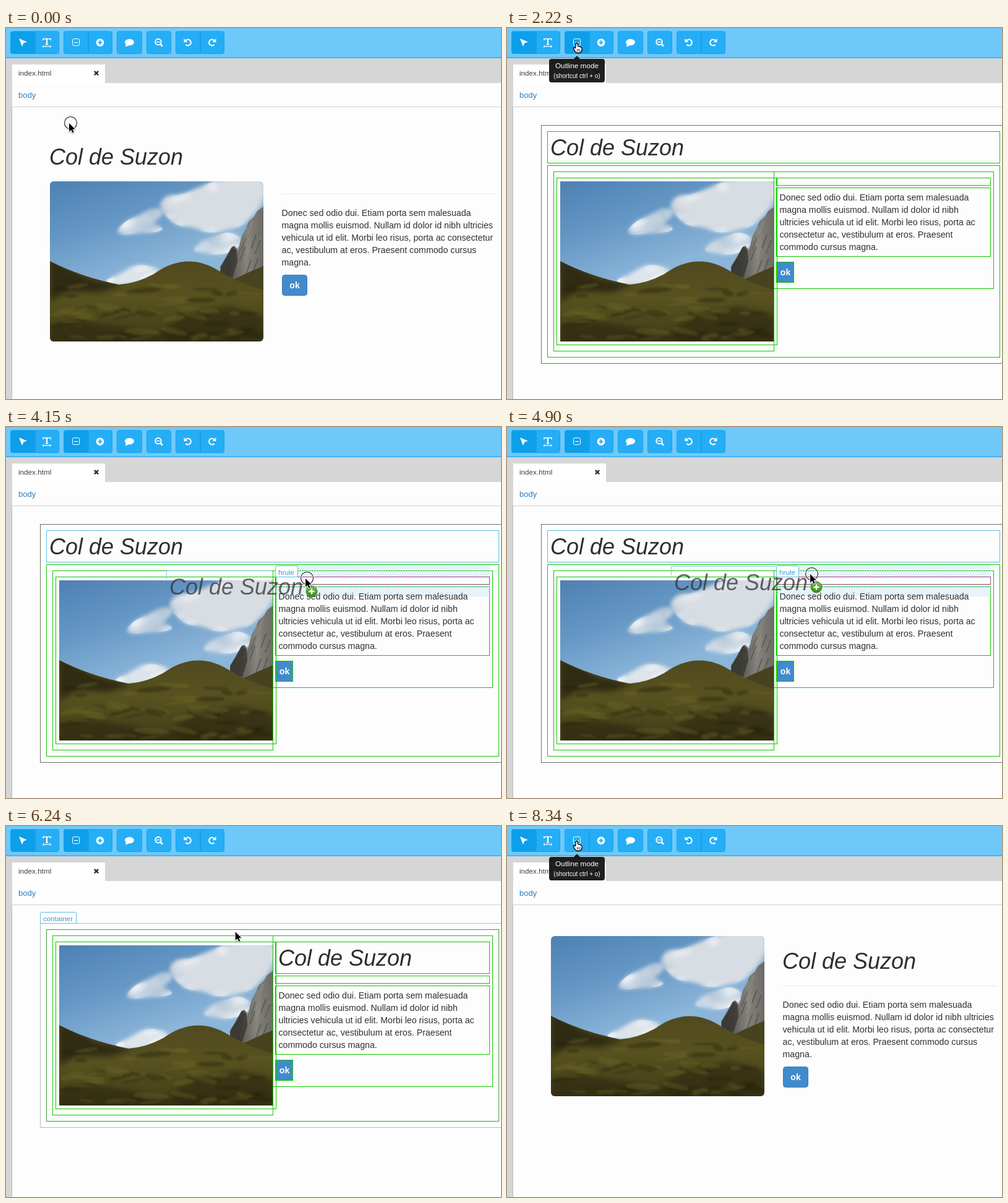
Animation of 800x600 px, one loop 9830 ms. Source, as an HTML page with a canvas:

```html
<!DOCTYPE html>
<html lang="en">
<head>
<meta charset="utf-8">
<title>Outline mode</title>
<style>
  html, body { margin: 0; width: 100%; height: 100%; overflow: hidden; background: #fff; }
  canvas { display: block; }
</style>
</head>
<body>
<canvas id="stage" width="800" height="600"></canvas>
<script>
const LOOP = 9830;
const ctx = document.getElementById('stage').getContext('2d');
const SANS = '"Liberation Sans", Arial, Helvetica, sans-serif';
const GREEN = '#12c800', CYAN = '#5cbde8', BLUE = '#25aef6', GRAY = '#66755f';
const TITLE = 'Col de Suzon';
const WIDE = [
  'Donec sed odio dui. Etiam porta sem malesuada',
  'magna mollis euismod. Nullam id dolor id nibh ultricies',
  'vehicula ut id elit. Morbi leo risus, porta ac consectetur',
  'ac, vestibulum at eros. Praesent commodo cursus',
  'magna.'
];
const NARROW = [
  'Donec sed odio dui. Etiam porta sem malesuada',
  'magna mollis euismod. Nullam id dolor id nibh',
  'ultricies vehicula ut id elit. Morbi leo risus, porta ac',
  'consectetur ac, vestibulum at eros. Praesent',
  'commodo cursus magna.'
];

// ---------- helpers ----------
function rect(x, y, w, h, color) {
  ctx.fillStyle = color;
  ctx.fillRect(x, y, w, h);
}

function round(x, y, w, h, r, fill, stroke) {
  ctx.beginPath();
  ctx.roundRect(x, y, w, h, r);
  if (fill) { ctx.fillStyle = fill; ctx.fill(); }
  if (stroke) { ctx.lineWidth = 1; ctx.strokeStyle = stroke; ctx.stroke(); }
}

function text(s, x, y, size, color, style = '', align = 'left') {
  ctx.font = `${style} ${size}px ${SANS}`;
  ctx.textAlign = align;
  ctx.fillStyle = color;
  ctx.fillText(s, x, y);
}

function box(x, y, right, bottom, color = GREEN) {
  ctx.lineWidth = 1;
  ctx.strokeStyle = color;
  ctx.strokeRect(x + .5, y + .5, right - x - 1, bottom - y - 1);
}

function poly(c, pts, close = true) {
  c.beginPath();
  for (let i = 0; i < pts.length; i += 2) c.lineTo(pts[i], pts[i + 1]);
  if (close) c.closePath();
}

function line(pts, width, color) {
  poly(ctx, pts, false);
  ctx.lineWidth = width;
  ctx.strokeStyle = color;
  ctx.stroke();
}

function smooth(c, pts) {
  const n = pts.length / 2;
  const at = i => [pts[(i % n) * 2], pts[(i % n) * 2 + 1]];
  c.beginPath();
  for (let i = 0; i <= n; i++) {
    const [x, y] = at(i), [u, v] = at(i + 1);
    if (i) c.quadraticCurveTo(x, y, (x + u) / 2, (y + v) / 2);
    else c.moveTo((x + u) / 2, (y + v) / 2);
  }
}

function randomizer(seed) {
  return () => (seed = (seed * 16807) % 2147483647) / 2147483647;
}

// ---------- landscape ----------
function makePhoto() {
  const cv = document.createElement('canvas');
  cv.width = 346;
  cv.height = 259;
  const c = cv.getContext('2d');
  const rnd = randomizer(77);

  const sky = c.createLinearGradient(0, 0, 60, 175);
  sky.addColorStop(0, '#4d81b3');
  sky.addColorStop(.5, '#6597c5');
  sky.addColorStop(1, '#8bb5d9');
  c.fillStyle = sky;
  c.fillRect(0, 0, 346, 259);

  const clouds = [
    [176, 40, 188, 22, 212, 22, 240, 10, 262, 1, 290, -6, 350, -8, 350, 30, 332, 52, 312, 72, 285, 80, 255, 84, 232, 74, 205, 72, 188, 56],
    [106, 83, 122, 64, 142, 56, 166, 43, 186, 46, 178, 60, 164, 68, 186, 76, 172, 83, 140, 84, 122, 87],
    [230, 112, 246, 96, 268, 90, 290, 80, 314, 94, 302, 110, 276, 120, 250, 116],
    [84, 162, 110, 152, 132, 137, 152, 134, 184, 144, 164, 158, 126, 172]
  ];
  const tones = ['#d7dde3', '#c3d2e0', '#cdd9e4', '#dde4ea'];
  clouds.forEach((pts, i) => {
    c.filter = 'blur(3px)';
    c.fillStyle = tones[i];
    smooth(c, pts);
    c.fill();
    c.save();
    c.clip();
    c.filter = 'blur(4px)';
    for (let k = 0; k < 9; k++) {
      const j = Math.floor(rnd() * pts.length / 2) * 2;
      c.fillStyle = k % 3 ? 'rgba(246,248,250,.6)' : 'rgba(160,182,204,.4)';
      c.beginPath();
      c.ellipse(pts[j], pts[j + 1] + 4, 9 + rnd() * 16, 5 + rnd() * 8, -.3, 0, 7);
      c.fill();
    }
    c.restore();
  });
  c.filter = 'none';

  // cliff
  const rock = c.createLinearGradient(290, 0, 346, 0);
  rock.addColorStop(0, '#56544f');
  rock.addColorStop(.5, '#85837c');
  rock.addColorStop(1, '#6c6a64');
  c.fillStyle = rock;
  poly(c, [346, 41, 336, 48, 331, 57, 323, 64, 318, 75, 311, 88, 305, 111, 299, 104, 294, 107, 284, 125, 276, 138, 276, 152, 300, 162, 346, 150]);
  c.fill();
  c.save();
  c.clip();
  c.lineWidth = 2;
  for (let i = 0; i < 26; i++) {
    const x = 278 + rnd() * 68, y = 50 + rnd() * 90;
    c.strokeStyle = i % 2 ? 'rgba(50,48,44,.4)' : 'rgba(165,162,152,.3)';
    c.beginPath();
    c.moveTo(x, y);
    c.lineTo(x - 8, y + 22);
    c.stroke();
  }
  c.restore();
  c.fillStyle = 'rgba(52,51,46,.75)';
  poly(c, [296, 105, 303, 112, 304, 130, 296, 156, 276, 152, 277, 138, 285, 125]);
  c.fill();

  // hills
  c.fillStyle = '#47431f';
  poly(c, [290, 162, 320, 148, 346, 137, 346, 200, 300, 190]);
  c.fill();
  const hill = c.createLinearGradient(0, 130, 0, 259);
  hill.addColorStop(0, '#514a20');
  hill.addColorStop(.45, '#57521f');
  hill.addColorStop(1, '#423d18');
  c.fillStyle = hill;
  c.beginPath();
  c.moveTo(0, 129);
  c.quadraticCurveTo(48, 154, 112, 167);
  c.quadraticCurveTo(140, 165, 168, 150);
  c.quadraticCurveTo(222, 111, 276, 146);
  c.quadraticCurveTo(302, 162, 346, 176);
  c.lineTo(346, 259);
  c.lineTo(0, 259);
  c.fill();
  c.save();
  c.clip();
  c.filter = 'blur(5px)';
  c.fillStyle = 'rgba(34,31,16,.72)';
  poly(c, [0, 125, 60, 156, 118, 168, 80, 180, 30, 178, 0, 195]);
  c.fill();
  c.fillStyle = 'rgba(36,33,14,.5)';
  poly(c, [0, 232, 60, 226, 130, 238, 180, 250, 180, 265, 0, 265]);
  c.fill();
  poly(c, [180, 240, 220, 215, 290, 202, 346, 218, 346, 262, 180, 262]);
  c.fill();
  c.filter = 'blur(1.5px)';
  for (let i = 0; i < 60; i++) {
    const x = rnd() * 346, y = 168 + rnd() * 90;
    c.fillStyle = i % 2 ? 'rgba(112,106,42,.36)' : 'rgba(38,34,14,.4)';
    c.beginPath();
    c.ellipse(x, y, 8 + rnd() * 22, 1.5 + rnd() * 4, (rnd() - .5) * .6, 0, 7);
    c.fill();
  }
  c.restore();
  return cv;
}
const photo = makePhoto();

// ---------- toolbar ----------
function button(x, right, active, corners = 3) {
  round(x + .5, 5.5, right - x - 1, 36, corners, active ? '#0d9fea' : BLUE, '#1a9fe6');
}

function turnIcon(x, dir) {
  ctx.save();
  ctx.translate(x, 23.5);
  ctx.scale(dir, 1);
  ctx.beginPath();
  ctx.arc(0, 0, 4.8, -2.5, 2.4);
  ctx.lineWidth = 2.2;
  ctx.strokeStyle = '#fff';
  ctx.stroke();
  poly(ctx, [-6.5, -6.5, -6.5, -.5, -.5, -.5]);
  ctx.fillStyle = '#fff';
  ctx.fill();
  ctx.restore();
}

function toolbar(outlined) {
  rect(0, 0, 800, 47, '#6ec9fa');
  rect(0, 47, 800, 2, '#45b4f0');
  const L = [3, 0, 0, 3], R = [0, 3, 3, 0];
  button(47, 86, false, R);
  button(7, 47, true, L);
  button(133, 172, false, R);
  button(93, 133, outlined, L);
  button(179, 220);
  button(227, 267);
  button(274, 314, false, L);
  button(314, 353, false, R);

  ctx.fillStyle = '#fff';
  poly(ctx, [21, 17, 34, 22.5, 28.5, 24.3, 26, 30]);
  ctx.fill();

  line([60, 20, 60, 17.5, 72, 17.5, 72, 20], 1.6, '#fff');
  line([66, 17, 66, 27], 2.2, '#fff');
  line([63.5, 26.8, 68.5, 26.8], 1.2, '#fff');
  line([59, 29.8, 73, 29.8], 1.2, '#fff');
  line([61, 28, 59, 29.8, 61, 31.6], 1, '#fff');
  line([71, 28, 73, 29.8, 71, 31.6], 1, '#fff');

  round(107.5, 17.5, 11, 11, 2, null, '#fff');
  line([110, 23.5, 116, 23.5], 1.2, '#fff');

  ctx.fillStyle = '#fff';
  ctx.beginPath();
  ctx.arc(152, 23.5, 6.3, 0, 7);
  ctx.fill();
  line([148.5, 23.5, 155.5, 23.5], 2, BLUE);
  line([152, 20, 152, 27], 2, BLUE);

  ctx.fillStyle = '#fff';
  ctx.beginPath();
  ctx.ellipse(199.5, 23, 7.5, 5.3, 0, 0, 7);
  ctx.fill();
  poly(ctx, [194, 25, 199, 28, 193, 30.5]);
  ctx.fill();

  ctx.beginPath();
  ctx.arc(246, 22.5, 4.7, 0, 7);
  ctx.lineWidth = 2;
  ctx.strokeStyle = '#fff';
  ctx.stroke();
  line([249.5, 26, 253, 29.5], 2.6, '#fff');
  line([243.5, 22.5, 248.5, 22.5], 1.5, '#fff');

  turnIcon(294, 1);
  turnIcon(333, -1);
}

function chrome(outlined) {
  rect(0, 0, 800, 600, '#d6d6d6');
  rect(10, 89, 790, 511, '#fdfdfd');
  rect(10, 59, 150, 30, '#fff');
  rect(10, 127, 790, 1, '#cfcfcf');
  rect(9, 128, 1, 472, '#b9b9b9');
  toolbar(outlined);
  text('index.html', 20, 77, 11.7, '#3a3f45');
  line([142.8, 69.8, 149.2, 76.2], 2.4, '#26323d');
  line([149.2, 69.8, 142.8, 76.2], 2.4, '#26323d');
  text('body', 20, 113, 13, '#327fbd');
}

// ---------- page ----------
function paragraph(lines, x, y) {
  lines.forEach((s, i) => text(s, x, y + i * 20, 14.2, '#303030'));
}

function title(x, y, color = '#2e2e2e') {
  text(TITLE, x, y, 36, color, 'italic');
}

function okButton(x, y, w, h, r) {
  round(x + .5, y + .5, w - 1, h - 1, r, '#428bca', '#357ebd');
  text('ok', x + w / 2, y + 22, 14, '#fff', 'bold', 'center');
}

function plainPage(moved) {
  const dy = moved ? -10 : 0;
  ctx.save();
  ctx.beginPath();
  ctx.roundRect(71, moved ? 178 : 248, 345, 259, 6);
  ctx.clip();
  ctx.drawImage(photo, 71, moved ? 178 : 248, 345, 259);
  ctx.restore();
  if (moved) title(445, 231);
  else title(70, 221);
  rect(446, 268 + dy, 345, 1, '#e8e8e8');
  paragraph(WIDE, 445.5, 304 + dy);
  okButton(446, 399 + dy, 41, 34, 4);
}

function label(s, x, bottom) {
  ctx.font = `11.7px ${SANS}`;
  const w = Math.round(ctx.measureText(s).width) + 10;
  round(x + .5, bottom - 17.5, w, 18, [2, 2, 0, 0], '#fff', CYAN);
  text(s, x + 5, bottom - 3, 11.7, '#3a98cc');
}

function hatch(x, y, w, h) {
  ctx.save();
  ctx.beginPath();
  ctx.rect(x, y, w, h);
  ctx.clip();
  ctx.beginPath();
  for (let i = -h; i < w; i += 4) {
    ctx.moveTo(x + i, y + h);
    ctx.lineTo(x + i + h, y);
  }
  ctx.lineWidth = 1;
  ctx.strokeStyle = '#a9daf3';
  ctx.stroke();
  ctx.restore();
}

function dropZone(name, x, y, right, bottom) {
  hatch(x, y - 19, right - x, 19);
  hatch(x, bottom, right - x, 19);
  box(x, y, right, bottom, '#a0447c');
  label(name, x, y);
}

function outlinePage(moved, hover, target) {
  const top = moved ? -55 : 0;
  ctx.drawImage(photo, 86, 248 + top);
  okButton(436, 378, 28, 34, 2);

  box(55, 157, 820, 543 + top, hover === 'container' ? '#aebcc2' : GRAY);
  box(65, 222 + top, 797, 533 + top, moved ? '#3d9a34' : GREEN);
  box(75, 232 + top, 432, 523 + top);
  box(80, 242 + top, 437, 513 + top);
  box(431, 232 + top, 787, 422);
  if (moved) {
    box(435, 187, 782, 239);
    title(440, 226);
  } else {
    box(65, 167, 797, 219, hover === 'header' || target !== undefined ? CYAN : GREEN);
    title(70, 206);
  }
  box(435, 242, 782, 255);
  box(435, 258, 782, 370);
  box(435, 378, 464, 412);
  if (target === 'row') dropZone('row', 65, 222, 797, 533);
  if (target === 'hrule') dropZone('hrule', 435, 242, 782, 255);
  paragraph(NARROW, 440.5, 279);
  if (hover === 'header') label('header', 65, 167);
  if (hover === 'container') label('container', 55, 157);
}

// ---------- overlays ----------
function tooltip(alpha) {
  ctx.save();
  ctx.globalAlpha = alpha;
  ctx.beginPath();
  ctx.roundRect(68, 50, 90, 38, 4);
  ctx.moveTo(108, 50);
  ctx.lineTo(113, 45);
  ctx.lineTo(118, 50);
  ctx.fillStyle = '#131313';
  ctx.fill();
  ctx.globalAlpha = Math.min(1, alpha + .35);
  text('Outline mode', 113, 65, 11.8, '#fff', '', 'center');
  text('(shortcut ctrl + o)', 113, 81, 10, '#fff', '', 'center');
  ctx.restore();
}

function ring(x, y) {
  for (const [w, color] of [[3, 'rgba(255,255,255,.8)'], [1.1, '#111']]) {
    ctx.beginPath();
    ctx.arc(x, y, 10, 0, 7);
    ctx.lineWidth = w;
    ctx.strokeStyle = color;
    ctx.stroke();
  }
}

function pointer(x, y, hand) {
  ctx.save();
  ctx.translate(x, y);
  ctx.lineJoin = 'round';
  ctx.shadowColor = 'rgba(0,0,0,.35)';
  ctx.shadowBlur = 2;
  ctx.shadowOffsetY = 1;
  if (hand) {
    smooth(ctx, [-2, -3, 1, -3, 1.5, 3, 4, 2.5, 6, 4, 8, 5, 8.5, 8, 6.5, 13, -1, 13.5, -4, 9, -6, 6, -4.5, 4, -2, 6.5]);
    ctx.fillStyle = '#fff';
    ctx.fill();
    ctx.shadowColor = 'transparent';
    ctx.lineWidth = 1.3;
    ctx.strokeStyle = '#000';
    ctx.stroke();
    for (let i = 0; i < 3; i++) line([.5 + i * 2.2, 7, .5 + i * 2.2, 11], .8, '#000');
  } else {
    poly(ctx, [0, 0, 0, 13.5, 3.2, 10.8, 5.4, 15.6, 7.7, 14.6, 5.5, 9.9, 9.6, 9.6]);
    ctx.lineWidth = 2;
    ctx.strokeStyle = '#fff';
    ctx.stroke();
    ctx.shadowColor = 'transparent';
    ctx.fillStyle = '#000';
    ctx.fill();
  }
  ctx.restore();
}

function ghost(x, y) {
  ctx.save();
  ctx.globalAlpha = .75;
  line([x - 224.5, y + 2, x - 224.5, y - 12.5, x - 54, y - 12.5], 1, CYAN);
  title(x - 220, y + 26, '#333');
  ctx.restore();
}

function addBadge(x, y) {
  const g = ctx.createLinearGradient(0, y - 9, 0, y + 9);
  g.addColorStop(0, '#7fc24e');
  g.addColorStop(1, '#2f8a12');
  ctx.beginPath();
  ctx.arc(x, y, 9, 0, 7);
  ctx.fillStyle = g;
  ctx.fill();
  ctx.lineWidth = 1;
  ctx.strokeStyle = '#3d7a24';
  ctx.stroke();
  line([x - 4.5, y, x + 4.5, y], 2.4, '#fff');
  line([x, y - 4.5, x, y + 4.5], 2.4, '#fff');
}

// ---------- timeline ----------
// [start, end, steps, x, y]: the pointer reaches x, y on the last step
const MOVES = [
  [450, 1480, 8, 113, 27],
  [2520, 3110, 5, 291, 182],
  [3708, 4150, 4, 484, 245],
  [4600, 4900, 3, 490, 238],
  [5800, 6840, 8, 113, 27]
];

function pointerAt(t) {
  let x = 102, y = 154;
  for (const [a, b, n, u, v] of MOVES) {
    if (t < a) break;
    const step = Math.floor((t - a) / ((b - a) / (n - 1)) + .02) + 1;
    const p = Math.min(1, step / n), e = p * p * (3 - 2 * p);
    x += (u - x) * e;
    y += (v - y) * e;
  }
  return [x, y];
}

const within = (t, a, b) => t >= a && t < b;

function tipAlpha(t) {
  if (within(t, 2070, 2220) || within(t, 7140, 7290)) return .55;
  if (within(t, 1330, 1480) || within(t, 6690, 6840)) return .5;
  return within(t, 1480, 2520) || t >= 6840 ? .95 : 0;
}

function draw(t) {
  const [x, y] = pointerAt(t);
  const outlined = within(t, 2220, 7290);
  const moved = t >= 5200;
  const dragging = within(t, 3700, 5200);
  const pressed = t < 150 || within(t, 2070, 2220) || within(t, 3560, 5350) || within(t, 7140, 7290);
  const hand = within(t, 2070, 2520) || t >= 6690;

  let hover = null, target;
  if (within(t, 2520, 3700) && y > 157) hover = 'header';
  if (t >= 5800 && y < 187) hover = 'container';
  if (dragging) target = t >= 4150 || y >= 232 ? 'hrule' : y >= 222 ? 'row' : null;

  chrome(outlined);
  if (outlined) outlinePage(moved, hover, target);
  else plainPage(moved);

  const tip = tipAlpha(t);
  if (tip) tooltip(tip);
  if (dragging) {
    ghost(x, y);
    if (target) addBadge(x + 10, y + 21);
  }
  if (pressed) ring(hand ? x : x + 2.5, hand ? y - 4 : y - .5);
  pointer(x, y, hand);
}

function frame(now) {
  draw(now % LOOP);
  requestAnimationFrame(frame);
}
draw(0);
requestAnimationFrame(frame);
</script>
</body>
</html>
```
